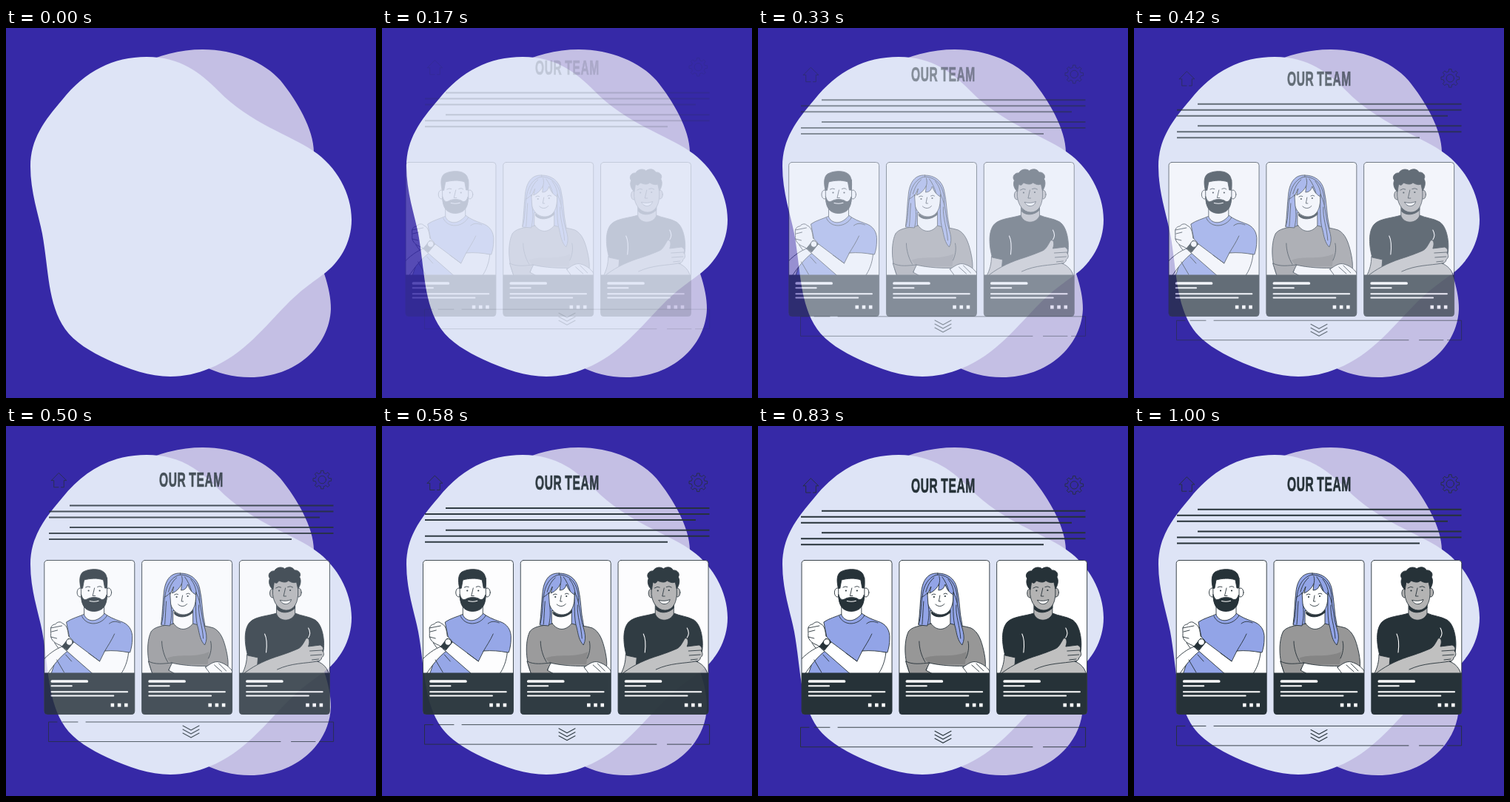
Recreate the animation shown at these times as an HTML page. Size 500x500 px, loop 1.04 s.

```html
<!DOCTYPE html>
<html lang="en">
<head>
<meta charset="utf-8">
<title>Our team</title>
<style>
  html, body { margin: 0; width: 100%; height: 100%; overflow: hidden; background: #3629a7; }
  svg { display: block; width: 100vw; height: 100vh; }
  .ink { fill: none; stroke: #263238; stroke-width: .9; stroke-linecap: round; stroke-linejoin: round; }
  .person path, .person ellipse { stroke: #263238; stroke-width: .9; stroke-linejoin: round; stroke-linecap: round; }
  .person .line { fill: none; }
  .person .light { fill: none; stroke: #fff; stroke-width: 1.1; }
  .person .shade { stroke: none; }
  .dark { fill: #263238; }
  .white { fill: #fff; }
  .blue { fill: #92a4e7; }
  .grey { fill: #979797; }
  .shade { fill: #858585; }
  .tan { fill: #b3b3b3; }
  .arm { fill: #c0c0c0; }
  .title {
    font: bold 28.4px "Liberation Sans", Arial, sans-serif;
    letter-spacing: .04em; word-spacing: -.06em; text-anchor: middle;
    fill: #263238; stroke: #263238; stroke-width: .6; vector-effect: non-scaling-stroke;
  }
</style>
</head>
<body>
<svg viewBox="0 0 500 500">
  <defs>
    <clipPath id="windows">
      <rect x="57.2" y="181.5" width="122" height="153" rx="4"/>
      <rect x="189" y="181.5" width="122" height="153" rx="4"/>
      <rect x="320.8" y="181.5" width="122" height="153" rx="4"/>
    </clipPath>
    <rect id="pane" y="181.5" width="122" height="208" rx="4"/>
    <g id="caption">
      <path class="dark" d="M0 333.5H122V385.5Q122 389.7 118 389.7H4Q0 389.7 0 385.5Z"/>
      <g stroke="#fff" stroke-linecap="round">
        <path d="M10.5 345H57.5" stroke-width="3.7"/>
        <path d="M9.7 351.3H37M9.7 359.3H112.3M9.7 364.5H93.5" stroke-width="2"/>
      </g>
      <path fill="#fff" d="M89.8 374.8h4.6v4.6h-4.6zM99 374.8h4.6v4.6h-4.6zM108.2 374.8h4.6v4.6h-4.6z"/>
      <use href="#pane" class="ink"/>
    </g>
  </defs>

  <rect width="500" height="500" fill="#3629a7"/>
  <path fill="#c4bfe4" d="M180 50C205 37 235 29 266 29C309 29 349 46 371 71C393 98 416 137 416 168L430 332C436 350 439 365 439 380C437 430 392 472 330 472C306 472 285 466 270 458Z"/>
  <path fill="#dee4f6" d="M190 39C236 39 262 60 287 85C330 129 385 145 415 166C447 187 467 224 467 259C467 291 450 317 430 332C413 345 402 351 380 373C351 402 321 442 275 460C258 467 241 471 222 471C195 471 165 461 137 448C115 438 92 424 80 407C56 372 58 328 49 278C44 252 33 222 33 187C33 150 52 125 76 97C107 58 145 39 190 39Z"/>

  <g id="page">
    <text class="title" transform="translate(250.4 87.8) scale(.548 1)">OUR TEAM</text>
    <path class="ink" d="M61.3 79L71.3 68.8L81.8 79H78.3V88.2H74.5M71 88.2H64.7V79H61.3"/>
    <path id="gear" class="ink"/>
    <circle class="ink" cx="427.3" cy="78" r="5.2"/>
    <path stroke="#263238" stroke-width="2" d="M86 112.8H442.5M58 120.8H442.5M58 128.8H424M86 142.5H442.5M58 150.5H442.5M58 158.5H386"/>
    <path class="ink" d="M69 405.4H57.5V431.9H371M76 405.4H97M108 405.4H442.6V431.9H423.5M418 431.9H385.5"/>
    <path class="ink" style="stroke-width:1.1" d="M239 410.5l11 6 11-6m-22 5l11 6 11-6m-22 5l11 6 11-6"/>
  </g>

  <g id="cards">
    <g class="white">
      <use href="#pane" x="57.2"/><use href="#pane" x="189"/><use href="#pane" x="320.8"/>
    </g>
    <g clip-path="url(#windows)">
      <!-- bearded man -->
      <g class="person">
        <path class="blue" d="M112 254C103 258 94 260 87 265L92 290L74 312L66 336H130L139 304L173 306C175 300 176 294 176 288C177 276 171 267 160 264C152 261 144 258 138 253Z"/>
        <path class="white" d="M111 240V255C114 263 126 268 138 254V240Z"/>
        <path class="line" d="M108 257C114 271 134 270 142 256"/>
        <ellipse class="white" cx="105.5" cy="225" rx="4" ry="6"/>
        <ellipse class="white" cx="144" cy="225" rx="4" ry="6"/>
        <path class="white" d="M107 205H142V230C141 243 134 249 124 249C114 249 108 243 107 230Z"/>
        <path class="dark" d="M106.5 219C104 208 105 200 110 197C118 192.500 132 192.500 137 197C142 200 143 209 141.500 219L139 219L137 208C128 205 119 206 111 208L109 219Z"/>
        <path class="dark" d="M107 228C110 237 113 235 117 233C122 231 127 231 132 233C136 236 139 235 141.5 228C142 241 138 250 124 250.5C111 250 107 241 107 228Z"/>
        <path class="light" d="M118.5 236.5Q124.5 238 130.5 236.3"/>
        <path class="line" d="M113 218q3-2 6-.5M129 217.5q4-2 6 .5M125 219L122.5 229.5H126"/>
        <circle class="dark" cx="117" cy="222.5" r="1.1"/><circle class="dark" cx="132" cy="222.5" r="1.1"/>
        <path class="white" d="M84 297C72 301 62 309 54 318V336H61C69 324 79 311 89 304Z"/>
        <path class="white" d="M96 291L132 318L139 304C150 303 161 304 171 306C170 317 166 328 160 336H124L84 301Z"/>
        <path class="white" d="M66 273C67 269 70 268 72 268C75 264 80 264 82 267C88 269 89 276 90 284L96 290L87 301L78 296C70 293 65 288 66 281Z"/>
        <path class="line" d="M66 273C71 272 76 271 81 270M67 278L75 276M66 285L74 287M71 293L76 300M132 318L117 307M145 267C151 262 157 265 160 266M152 281C148 290 143 297 139 304M74 316L84 333M86 309L94 318"/>
        <path class="dark" d="M81 298L90 287L97 292L88 303Z"/>
        <circle class="white" cx="91" cy="292" r="4.3" stroke="#263238"/>
      </g>

      <!-- woman -->
      <g class="person">
        <path class="blue" d="M241 199C228 198 221 208 219 223C217 239 217 254 215 268L232 273H262C267 285 270 292 274 296C279 288 275 277 274 268C270 250 271 236 267 219C264 206 254 199 241 199Z"/>
        <path class="white" d="M231 250V270C239 278 251 277 258 269V249Z"/>
        <path class="dark" d="M233 251C241 258 251 257 258 248V252C250 259 239 260 233 254Z"/>
        <path class="grey" d="M232 267C224 270 209 269 202 277C196 287 194 314 204 336H302C307 328 306 316 303 303C300 290 296 278 286 273C278 270 266 270 258 267C250 277 239 277 232 267Z"/>
        <path class="shade" d="M223 314C236 307 262 314 280 305L278 322H230Z"/>
        <path class="white" d="M226 222C226 212 235 209 246 209C258 209 262 217 262 229C262 246 256 255 245 255C234 255 226 244 226 230Z"/>
        <path class="blue" d="M241 201C230 203 221 214 220 234L227 228L232 217L230 226Q239 222 243 213L242 222Q249 222 251 214Q254 224 262 228L267 245C269 222 263 202 241 201Z"/>
        <path class="blue" d="M220 231C224 229 226 227 227 225L228 240C230 252 229 261 227 270L215 269C219 257 218 242 220 231Z"/>
        <path class="blue" d="M262 225C267 232 269 248 271 261C273 273 280 284 274 296C268 290 267 282 265 273C261 261 262 242 262 225Z"/>
        <path class="line" d="M222 237C221 248 221 258 220 268M266 242C265 257 271 270 272 287M243 203C244 207 244 210 243 213M247 204C251 209 254 216 256 223M236 205C230 210 227 217 225 224M255 207C260 213 262 219 263 227M233 228q3-2 5-.5M249 227q3-2 5 0M244 229L242.500 237H245M238 241C241 244 246 245 250 240.500"/>
        <circle class="dark" cx="236" cy="231" r="1.1"/><circle class="dark" cx="251" cy="230" r="1.1"/>
        <path class="white" d="M229 320C245 324 267 325 284 324L288 336H224Z"/>
        <path class="grey" d="M198 318C207 323 219 321 230 320L225 330L236 336H204Z"/>
        <path class="white" d="M275 326C281 322 287 317 294 319C301 321 307 325 311 331V336H281C280 331 276 329 275 326Z"/>
        <path class="line" d="M287 323L297 332M293 321L303 331M216 291C216 300 219 311 224 319M282 291C284 299 282 308 279 314"/>
      </g>

      <!-- curly-haired man -->
      <g class="person">
        <path class="arm" d="M331 309C331 318 329 327 324 336H360V312Z"/>
        <path class="dark" d="M371 253C359 257 343 257 335 265C326 275 328 295 332 310L346 313L344 336H420L434 306C437 290 433 268 423 262C414 257 405 257 396 253Z"/>
        <path class="tan" d="M371 238V254C375 265 391 265 396 254V238Z"/>
        <path class="dark" d="M372 243C381 251 389 249 396 241V246C389 253 378 254 372 248Z"/>
        <ellipse class="tan" cx="365.5" cy="226" rx="3.6" ry="6"/>
        <ellipse class="tan" cx="401" cy="225" rx="3.6" ry="6"/>
        <path class="tan" d="M366 207H400V228C399 243 392 249 384 249C374 249 367 239 366 228Z"/>
        <path class="dark" d="M366 221C361 217 360 210 362 206C358 201 363 195 368 196C371 190 379 190 382 193C387 189 394 191 395 195C401 194 405 200 402 204C405 209 403 216 400 220L398 211C393 213 389 210 387 209C383 213 377 210 374 209C372 214 369 212 368 211Z"/>
        <path class="line" d="M370 219q4-3 7-1M386 217.5q4-2 7 .5M383 219L380.5 230H384"/>
        <circle class="dark" cx="374.5" cy="222.5" r="1.1"/><circle class="dark" cx="389.5" cy="222" r="1.1"/>
        <path class="white" d="M376 235.5C381 237 387 236.5 391 234.5C389 242 379 243 376 235.5Z"/>
        <path class="arm" d="M325 336C337 326 352 318 370 312C383 308 393 304 400 301C405 299 408 292 411 287C416 285 416 293 414 298L430 296C434 298 435 301 433 304C436 307 435 311 432 313C432 316 429 318 426 318C434 321 440 327 442 336Z"/>
        <path class="line" d="M372 329C391 320 410 321 426 318M416 304L433 303M417 310L432 309M419 316L428 315"/>
        <path class="light" d="M355 281C359 289 358 298 357 306M414 273C417 278 416 283 414 286"/>
      </g>
    </g>
    <use href="#caption" x="57.2"/><use href="#caption" x="189"/><use href="#caption" x="320.8"/>
  </g>
</svg>
<script>
  const LOOP = 1040, STEP = 1000 / 24, TRAVEL = 30;
  const page = document.getElementById('page');
  const cards = document.getElementById('cards');

  function gearPath(cx, cy, teeth) {
    const points = [];
    for (let i = 0; i < teeth; i++) {
      for (const [turn, r] of [[-.27, 9.4], [-.18, 12.4], [.18, 12.4], [.27, 9.4]]) {
        const a = (i + turn) * 2 * Math.PI / teeth;
        points.push((cx + r * Math.cos(a)).toFixed(2) + ' ' + (cy + r * Math.sin(a)).toFixed(2));
      }
    }
    return 'M' + points.join('L') + 'Z';
  }

  const bezier = (s, a, b) => 3 * (1 - s) ** 2 * s * a + 3 * (1 - s) * s * s * b + s ** 3;

  // cubic-bezier(.36, -.01, .5, 1.38)
  function ease(x) {
    let low = 0, high = 1;
    for (let i = 0; i < 30; i++) {
      const mid = (low + high) / 2;
      if (bezier(mid, .36, .5) < x) low = mid; else high = mid;
    }
    return bezier(low, -.01, 1.38);
  }

  function draw(time) {
    // The motion is held at 24 pictures a second, each starting on a 10 ms tick.
    const tick = Math.floor((time % LOOP + 4.99) / STEP);
    const progress = tick < 2 ? 0 : ease(Math.min(1, (tick + 1) / 24));
    const shift = TRAVEL * (progress - 1);
    const opacity = Math.max(0, Math.min(1, progress));
    page.setAttribute('transform', `translate(0 ${shift})`);
    cards.setAttribute('transform', `translate(${shift} 0)`);
    page.setAttribute('opacity', opacity);
    cards.setAttribute('opacity', opacity);
  }

  document.getElementById('gear').setAttribute('d', gearPath(427.3, 78, 8));
  const start = performance.now();
  function loop() {
    draw(performance.now() - start);
    requestAnimationFrame(loop);
  }
  loop();
</script>
</body>
</html>
```
